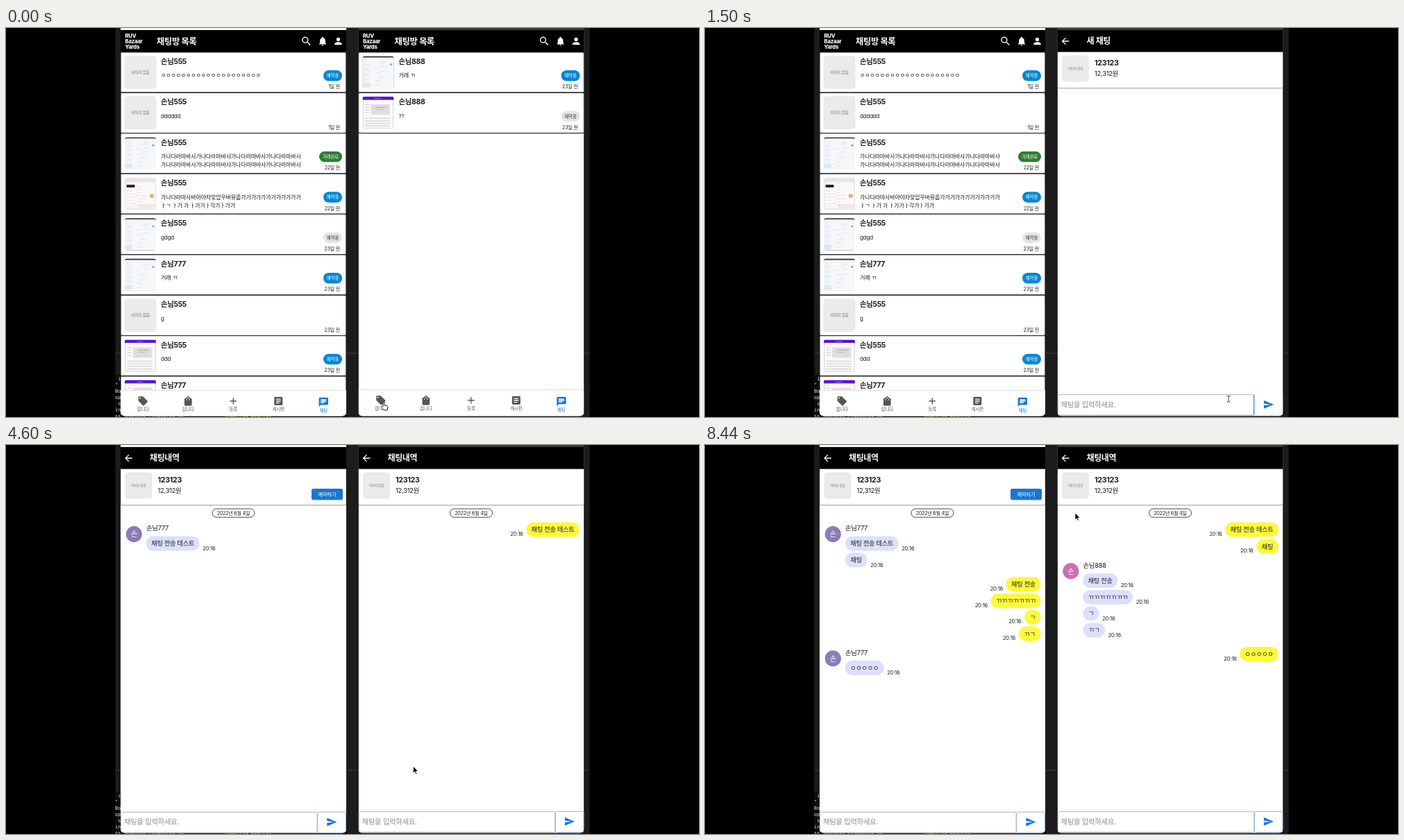
Recreate the animation shown at these times as an HTML page. Size 998x561 px, loop 8.58 s.

```html
<!DOCTYPE html>
<html lang="ko">
<head>
<meta charset="utf-8">
<title>채팅 데모</title>
<style>
html, body { margin: 0; width: 100%; height: 100%; overflow: hidden; background: #000; }
svg { display: block; }
#stage { width: 100vw; height: 100vh; }
text { font-family: Inter, "Noto Sans CJK KR", "Noto Sans CJK", sans-serif; letter-spacing: -.03em; white-space: pre; }
.mono { font-family: "DejaVu Sans Mono", monospace; letter-spacing: 0; }
</style>
</head>
<body>
<svg id="stage" viewBox="0 0 998 561"></svg>
<script>
const LOOP = 8580, W = 325, BLUE = '#1976d2', INK = '#1d1d1d';
const stage = document.getElementById('stage');

const ICON = {
  tag: 'M21.4 11.6l-9-9C12 2.2 11.5 2 11 2H4a2 2 0 0 0-2 2v7c0 .5.2 1 .6 1.4l9 9a2 2 0 0 0 2.8 0l7-7a2 2 0 0 0 0-2.8zM5.5 7a1.5 1.5 0 1 1 0-3 1.5 1.5 0 0 1 0 3z',
  bag: 'M18 6h-2a4 4 0 0 0-8 0H6a2 2 0 0 0-2 2v12a2 2 0 0 0 2 2h12a2 2 0 0 0 2-2V8a2 2 0 0 0-2-2zm-8 4H8V8h2zm2-6a2 2 0 0 1 2 2h-4a2 2 0 0 1 2-2zm4 6h-2V8h2z',
  plus: 'M19 13h-6v6h-2v-6H5v-2h6V5h2v6h6z',
  board: 'M5 3h14a2 2 0 0 1 2 2v14a2 2 0 0 1-2 2H5a2 2 0 0 1-2-2V5a2 2 0 0 1 2-2zm2 4v2h10V7zm0 4v2h10v-2zm0 4v2h7v-2z',
  chat: 'M20 2H4a2 2 0 0 0-2 2v18l4-4h14a2 2 0 0 0 2-2V4a2 2 0 0 0-2-2zM6 9h12v2H6zm8 5H6v-2h8zm4-6H6V6h12z',
  search: 'M15.5 14h-.8l-.3-.3A6.5 6.5 0 1 0 13.7 14.4l.3.3v.8l5 5 1.5-1.5zM9.5 14a4.5 4.5 0 1 1 0-9 4.5 4.5 0 0 1 0 9z',
  bell: 'M12 22a2 2 0 0 0 2-2h-4c0 1.1.9 2 2 2zm6-6v-5c0-3.1-1.6-5.6-4.5-6.3V4a1.5 1.5 0 0 0-3 0v.7C7.6 5.4 6 7.9 6 11v5l-2 2v1h16v-1z',
  person: 'M12 12a4 4 0 1 0 0-8 4 4 0 0 0 0 8zm0 2c-2.7 0-8 1.3-8 4v2h16v-2c0-2.7-5.3-4-8-4z',
  back: 'M20 11H7.8l5.6-5.6L12 4l-8 8 8 8 1.4-1.4L7.8 13H20z',
  send: 'M2 21l21-9L2 3v7l15 2-15 2z',
  heart: 'M12 20.5C5 14.3 2.8 12 2.8 8.6a4.8 4.8 0 0 1 4.7-4.8c1.7 0 3.4.9 4.5 2.4 1.1-1.5 2.8-2.4 4.5-2.4a4.8 4.8 0 0 1 4.7 4.8c0 3.4-2.2 5.7-9.2 11.9z'
};

// Text is placed by its vertical centre.
function text(x, cy, size, str, o = {}) {
  return `<text x="${x}" y="${cy + size * .37}" font-size="${size}" fill="${o.fill || INK}" font-weight="${o.bold || 400}" text-anchor="${o.at || 'start'}" ${o.attr || ''}>${str}</text>`;
}
function rect(x, y, w, h, fill, r = 0, extra = '') {
  return `<rect x="${x}" y="${y}" width="${w}" height="${h}" fill="${fill}" rx="${r}" ${extra}/>`;
}
function icon(name, cx, cy, size, fill, extra = '') {
  const k = size / 24;
  return `<path transform="translate(${cx - size / 2} ${cy - size / 2}) scale(${k})" d="${ICON[name]}" fill="${fill}" fill-rule="evenodd" ${extra}/>`;
}
const mid = (o = {}) => ({ at: 'middle', ...o });
const end = (o = {}) => ({ at: 'end', ...o });

function random(seed) {
  return () => (seed = (seed * 16807) % 2147483647) / 2147483647;
}

// Thumbnails, drawn on a 100 by 100 field.
const THUMB = {
  doc(rnd) {
    let s = rect(0, 0, 100, 100, '#3a2530', 8) + rect(0, 4, 100, 96, '#f6f7f9', 4) + rect(0, 8, 22, 84, '#f0f3f7') + rect(0, 84, 24, 12, '#d9e9f9');
    for (let i = 0; i < 17; i++) s += rect(i % 3 ? 32 + rnd() * 30 : 5, 12 + i * 4.8, 6 + rnd() * 16, 1.2, '#d3d7df');
    return s + rect(87, 23, 8, 5, '#6ba6f0', 2.5) + rect(62, 8, .8, 88, '#e6e8ec');
  },
  board(rnd) {
    let s = rect(0, 0, 100, 100, '#ece2ee', 8) + rect(3, 14, 94, 82, '#faf9fa') + rect(6, 22, 26, 8, '#181818') + rect(44, 82, 54, 12, '#f9e4e5');
    for (let i = 0; i < 16; i++) s += rect(i % 2 ? 6 : 42, 16 + i * 4.9, 10 + rnd() * 22, 1.3, '#d6d1d8');
    return s + rect(80, 51, 13, 11, '#dcb56b', 2) + rect(36, 14, 1, 82, '#e2d8e0');
  },
  form() {
    let s = rect(0, 0, 100, 100, '#d9d9df', 7) + rect(0, 0, 100, 12, '#5a12d8', 5) + rect(3, 10, 94, 87, '#fafafa') + rect(27, 24, 60, 32, '#e0dcdf') + rect(42, 32, 36, 1.5, '#999') + rect(42, 38, 24, 1.5, '#aaa');
    for (let i = 0; i < 4; i++) s += rect(8, 65 + i * 8, 80, 4, '#dedee2') + rect(8, 24 + i * 8, 14, 2, '#c8c8cd');
    return s + rect(38, 5, 20, 1.5, '#b99cf2');
  },
  dark(rnd) {
    let s = rect(0, 0, 100, 100, '#4d2179', 7) + rect(0, 4, 100, 96, '#1b2a31', 6) + rect(0, 8, 14, 88, '#1f3038');
    for (let i = 0; i < 26; i++) s += rect(18 + (i % 2) * 36 + rnd() * 10, 12 + i * 3.2, 4 + rnd() * 14, .9, i % 4 ? '#384b53' : '#55716f');
    return s + rect(58, 8, .8, 90, '#2f4049');
  },
  cal() {
    let s = rect(0, 0, 100, 100, '#fbf9f8', 7) + rect(4, 5, 12, 2.5, '#a05a62');
    for (let i = 0; i < 35; i++) s += rect(5 + i % 7 * 13.5, 18 + Math.floor(i / 7) * 16, 2.5, 1.6, '#c3bec0') + rect(3 + i % 7 * 13.5, 15 + Math.floor(i / 7) * 16, 12, .5, '#efe8e8');
    return s + rect(44, 38, 12, 2.5, '#f5cdc8') + rect(70, 70, 12, 2.5, '#f5cdc8');
  }
};
function thumb(kind, x, y, w, h, label) {
  if (kind === 'none')
    return rect(x, y, w, h, '#ebebeb', 4, 'stroke="#dedede" stroke-width=".6"') + text(x + w / 2, y + h / 2, label, '이미지 없음', mid({ fill: '#777' }));
  return `<svg x="${x}" y="${y}" width="${w}" height="${h}" viewBox="0 0 100 100" preserveAspectRatio="none">${THUMB[kind](random(kind.length * 97 + 5))}</svg>`;
}

const CHIP = { blue: ['예약중', '#0288d1', '#fff', 27], green: ['거래완료', '#2e7d32', '#fff', 33], gray: ['예약중', '#e4e4e4', '#333', 27] };
function chip(kind, right, cy) {
  const [label, bg, fg, w] = CHIP[kind];
  return rect(right - w, cy - 7.7, w, 15.4, bg, 7.7) + text(right - w / 2, cy, 6.5, label, mid({ fill: fg, bold: 500 }));
}

const ga = '가나다라마바사'.repeat(4);
const ROOMS = [
  ['손님555', ['ㅇ'.repeat(20)], 'blue', '1일 전', 'none'],
  ['손님555', ['dddddd'], '', '1일 전', 'none'],
  ['손님555', [ga, ga], 'green', '22일 전', 'doc'],
  ['손님555', ['가나다라마사바아아자앚압우버뮤웁' + '가'.repeat(12), 'ㅏㄱ ㅏ가 가 ㅏ가가ㅏ각가ㅏ가가'], 'blue', '22일 전', 'board'],
  ['손님555', ['gdgd'], 'gray', '23일 전', 'doc'],
  ['손님777', ['거래 ㄲ'], 'blue', '23일 전', 'doc'],
  ['손님555', ['g'], '', '23일 전', 'none'],
  ['손님555', ['ddd'], 'blue', '23일 전', 'form'],
  ['손님777', [''], '', '', 'form']
];
const NEW_ROOM = ['손님777', ['채팅 전송 테스트'], '', '', 'none'];
const MY_ROOMS = [
  ['손님888', ['거래 ㄲ'], 'blue', '23일 전', 'doc'],
  ['손님888', ['??'], 'gray', '23일 전', 'form']
];
const ITEMS = [
  ['123123', '', '12,312원', '1시간 전', 'none'],
  ['등록 글 수정 테스트', '', '10,000원', '2시간 전', 'none'],
  ['asdasd', '기초도면실습II / 문가람', '20,000원', '2시간 전', 'dark'],
  ['123123', '생활작문 / 토바린메즈', '123,123원', '3시간 전', 'cal'],
  ['팝니다 등록 테스트', '기초도면실습II / 문가람', '20,000원', '3시간 전', 'dark'],
  ['ㅇ'.repeat(25), '실용의사소통연습 / 표나율', '21,212원', '22일 전', 'none'],
  ['이미지도 올리고 수정', '전공탐색과생애설... / 하루미세나', '2,222원', '22일 전', 'board']
];

const frameRow = (y, h) => rect(0, y, W, h, '#fff', 2, 'stroke="#333" stroke-width="1.4"');

function roomRow([name, lines, mark, ago, pic], i) {
  const y = 34.8 + i * 58.4;
  return frameRow(y, 58.4) + thumb(pic, 6, y + 5.8, 45, 46.6, 5.7) +
    text(58, y + 13.2, 10.4, name, { bold: 700 }) +
    lines.map((s, n) => text(58, y + 33.6 + n * 12.3, 8.1, s)).join('') +
    (mark ? chip(mark, 319, y + 34) : '') + text(316, y + 50, 7, ago, end());
}

function itemRow([title, course, price, ago, pic], i) {
  const y = 34.6 + i * 70.4, x = 76.5;
  let s = frameRow(y, 70.4) + thumb(pic, 4, y + 3.6, 65.5, 62.5, 8.1) + text(x, y + 12.2, 9.15, title);
  if (i === 5) s += text(x, y + 25.5, 9.15, 'ㅇ'.repeat(20));
  if (course) s += rect(74, y + 38.2, 34.5, 13.2, '#e4e4e4', 6.6) + text(91.2, y + 44.8, 6.3, '대학', mid({ bold: 500 })) + text(112, y + 44.8, 7.1, course);
  if (i === 6) s += chip('gray', 318.5, y + 44.8);
  return s + text(x, y + 58.6, 11.8, price, { bold: 700 }) + text(317.5, y + 60.6, 7, ago, end({ fill: '#555' })) +
    icon('heart', 310.5, y + 13.4, 16, 'none', 'stroke="#555" stroke-width="2"');
}

function header(title) {
  const brand = ['RUV', 'Bazaar', 'Yards'].map((s, i) => text(6.5, 11.6 + i * 7.8, 7.7, s, { fill: '#fff', bold: 800 })).join('');
  return rect(0, 3, W, 31.6, '#000') + brand + text(52, 19, 12.3, title, { fill: '#fff', bold: 700 }) +
    icon('search', 267.7, 19, 17, '#fff') + icon('bell', 291, 19, 15.5, '#fff') + icon('person', 313.5, 19, 15.5, '#fff');
}

function nav(active, top) {
  const tabs = [['tag', '팝니다'], ['bag', '삽니다'], ['plus', '등록'], ['board', '게시판'], ['chat', '채팅']];
  return rect(0, top, W, 40, '#fff') + rect(0, top - 1, W, 1.4, '#e6e6e6') + tabs.map(([name, label], i) => {
    const on = i === active, fill = on ? BLUE : '#555', x = 32.3 + i * 65, y = top + (on ? 1.6 : 0);
    return icon(name, x, y + 15, 16, fill) + text(x, y + 26.7, 6.4, label, mid({ fill }));
  }).join('');
}

// [time, own message, text, bubble width, centre y]
const LEFT_CHAT = [
  [0, 0, '채팅 전송 테스트', 77, 142], [5100, 0, '채팅', 32, 166], [6300, 1, '채팅 전송', 50, 200.7],
  [6700, 1, 'ㄲ'.repeat(7), 72, 224.7], [7000, 1, 'ㄱ', 23.5, 248.2], [7300, 1, 'ㄲㄱ', 32, 272.2], [8100, 0, 'ㅇ'.repeat(5), 56, 321.5]
];
const RIGHT_Y = [122, 146.3, 195.5, 219.4, 243, 267, 301.5];
const RIGHT_CHAT = LEFT_CHAT.map(([t, own, s, w], i) => [t || 3100, 1 - own, s, w, RIGHT_Y[i]]);
const LEFT_HEADS = [[0, '손님777', 120], [8100, '손님777', 299.3]];
const RIGHT_HEADS = [[6300, '손님888', 173.3]];

function bubble([, own, str, w, cy]) {
  const x = own ? 318.5 - w : 36.7;
  return rect(x, cy - 10.5, w, 21, own ? '#fbf93c' : '#dcdffd', 10.5) + text(x + w / 2, cy, 9.2, str, mid()) +
    (own ? text(x - 4.5, cy + 6.3, 7.6, '20:16', end()) : text(x + w + 4.5, cy + 6.8, 7.6, '20:16'));
}
function head([, name, cy], color) {
  return `<circle cx="19.3" cy="${cy + 8.6}" r="11.6" fill="${color}"/>` + text(19.3, cy + 8.6, 10.4, name[0], mid({ fill: '#fff' })) + text(37, cy, 9.4, name);
}

// What each input holds from a given time on; an empty string means sent.
const LEFT_TYPING = [[0, ''], [5600, 'ㅊ'], [5700, '채'], [5800, '채티'], [5900, '채팅'], [6000, '채팅 저'], [6100, '채팅 전ㅅ'], [6200, '채팅 전송'], [6300, ''],
  [6400, 'ㄲㄲ'], [6500, 'ㄲㄲㄲㄲ'], [6600, 'ㄲ'.repeat(7)], [6700, ''], [6900, 'ㄱ'], [7000, ''], [7100, 'ㄲ'], [7200, 'ㄲㄱ'], [7300, '']];
const RIGHT_TYPING = [[0, ''], [1900, 'ㅊ'], [2000, '채'], [2100, '채티'], [2200, '채팅'], [2300, '채팅 저'], [2400, '채팅 전'], [2500, '채팅 전소'], [2600, '채팅 전송'],
  [2800, '채팅 전송 테'], [2900, '채팅 전송 테스트'], [3100, ''], [4800, '채'], [4900, '채팅'], [5100, ''], [7800, 'ㅇ'], [7900, 'ㅇㅇㅇ'], [8000, 'ㅇ'.repeat(5)], [8100, '']];
const LEFT_FOCUS = [[5500, 7600]], RIGHT_FOCUS = [[1800, 3200], [4700, 5300], [7700, 8200]];
const latest = (list, t) => list.filter(e => e[0] <= t).pop();
const within = (spans, t) => spans.some(([a, b]) => t >= a && t < b);

function inputBar(str, focused, hover, y, sendBorder) {
  const edge = focused ? 'stroke="#1565c0" stroke-width="1.6"' : 'stroke="#aaa" stroke-width=".9"';
  let s = rect(0, y, W, 31, '#fff') + rect(283.8, y + .5, 40.7, 30, hover ? '#f1f7fd' : '#fff', 2, sendBorder ? 'stroke="#8fbce9" stroke-width="1"' : '') +
    rect(.7, y + .7, 282.4, 29.6, '#fff', 2, edge) + icon('send', 304, y + 15, 16, BLUE);
  if (!sendBorder) s += rect(282.6, y + 1, 1, 29, BLUE);
  if (!str) return s + text(5, y + 14.7, 10.4, '채팅을 입력하세요.', { fill: '#8c8c8c' });
  const last = str.length - 1;
  return s + text(5, y + 14.7, 10.4, str.slice(0, last) + `<tspan text-decoration="underline">${str[last]}</tspan>`, { attr: 'class="typed"' }) +
    `<rect class="caret" x="5" y="${y + 9}" width=".8" height="12" fill="#111"/>`;
}

function chatPage(title, body, bar, button) {
  let s = rect(0, 3, W, 31.6, '#000') + icon('back', 11.5, 19, 16, '#fff') + text(42, 19, 12, title, { fill: '#fff', bold: 700 }) +
    `<path d="M0 35V85q0 1.8 2 1.8H${W - 2}q2 0 2-1.8V35" fill="none" stroke="#999" stroke-width="1"/>` +
    thumb('none', 7.2, 40, 37.6, 37, 4.6) + text(53.5, 50, 10.7, '123123', { bold: 700 }) + text(53.5, 66, 9.4, '12,312원');
  if (button) s += rect(275, 63.8, 45, 16, '#9fb4c9', 2.5) + rect(275, 63, 45, 15.8, BLUE, 2.5) + text(297.5, 70.8, 7.3, '예약하기', mid({ fill: '#fff', bold: 500 }));
  return s + body + bar;
}
const datePill = rect(132, 92, 61, 12.2, '#fff', 6.1, 'stroke="#333" stroke-width=".9"') + text(162.5, 98.1, 7.1, '2022년 6월 4일', mid());

function chatBody(chat, heads, color, t) {
  const past = e => e[0] <= t;
  return datePill + heads.filter(past).map(h => head(h, color)).join('') + chat.filter(past).map(bubble).join('');
}

function leftPanel(t) {
  if (t >= 4300)
    return chatPage('채팅내역', chatBody(LEFT_CHAT, LEFT_HEADS, '#8c7bb9', t),
      inputBar(latest(LEFT_TYPING, t)[1], within(LEFT_FOCUS, t), t >= 7000 && t < 7400, 528.7, true), true);
  let body = ROOMS.map(roomRow).join('');
  if (t >= 3500) body = text(162.5, 46, 9.3, '채팅방 목록 더보기', mid({ fill: BLUE }));
  if (t >= 4000) body = [NEW_ROOM, ...ROOMS].map(roomRow).join('');
  return body + header('채팅방 목록') + nav(4, 523);
}

function rightPanel(t) {
  if (t < 200) return MY_ROOMS.map(roomRow).join('') + header('채팅방 목록') + nav(4, 522);
  if (t < 1400) {
    const tip = t >= 500 ? rect(0, 546, 93.5, 14, '#2c2c2e', 2) + text(3.5, 552.5, 8, 'localhost:3000/item/66', { fill: '#fff', bold: 500 }) : '';
    return ITEMS.map(itemRow).join('') + header('팝니다') + nav(0, 522) + tip;
  }
  const bar = inputBar(latest(RIGHT_TYPING, t)[1], within(RIGHT_FOCUS, t), false, 528, t >= 3100);
  return t < 3100 ? chatPage('새 채팅', '', bar) : chatPage('채팅내역', chatBody(RIGHT_CHAT, RIGHT_HEADS, '#c86fb6', t), bar);
}

// [time, x, y, shape]
const POINTER = [
  [0, 545, 545, 'hand'], [300, 545, 545, 'hand'], [800, 639, 67, 'hand'], [1100, 639, 67, 'hand'], [1400, 754, 535, 'beam'], [1900, 754, 535, ''],
  [3100, 754, 535, 'arrow'], [3400, 457, 543, 'hand'], [3500, 457, 543, 'arrow'], [3800, 377, 370, 'arrow'], [4000, 377, 370, 'arrow'],
  [4200, 310, 65, 'hand'], [4300, 310, 65, 'arrow'], [4700, 640, 543, 'beam'], [4800, 640, 543, ''], [5100, 640, 543, 'arrow'],
  [5500, 310, 543, 'beam'], [5600, 400, 545, ''], [6800, 400, 545, 'beam'], [7000, 460, 550, 'hand'], [7300, 460, 550, 'arrow'],
  [7700, 640, 543, 'beam'], [7800, 640, 543, ''], [8100, 640, 543, 'arrow'], [8300, 578, 135, 'arrow'], [8440, 535, 103, 'arrow']
];
const SHAPE = {
  hand: '<path d="M-2 1V-5a1 1 0 0 1 2 0V-1l3.6.8q1.5.4 1.3 2L4.2 6H-1L-4.5 2.2q-.6-1.3.8-1.2z" fill="#fff" stroke="#222" stroke-width="1"/>',
  arrow: '<path d="M-2-5V5L.3 2.9 1.8 6.3 3.4 5.6 1.9 2.3H5z" fill="#000" stroke="#fff" stroke-width=".7"/>',
  beam: '<path d="M-2.5-4.5Q0-4.5 0-3V3Q0 4.5-2.5 4.5M2.5-4.5Q0-4.5 0-3M0 3Q0 4.5 2.5 4.5" fill="none" stroke="#444" stroke-width="1"/>'
};
function pointer(t) {
  const a = latest(POINTER, t), b = POINTER[POINTER.indexOf(a) + 1] || a;
  if (!a[3]) return '';
  const u = b === a ? 0 : (t - a[0]) / (b[0] - a[0]), k = u * u * (3 - 2 * u);
  return `<g transform="translate(${a[1] + (b[1] - a[1]) * k} ${a[2] + (b[2] - a[2]) * k})">${SHAPE[a[3]]}</g>`;
}

function backdrop() {
  const bits = [' i', '"', 'Bo', 'op', ' s', 'in', 'ss'];
  return rect(0, 0, 998, 561, '#000') + rect(157.5, 0, 683, 561, '#1c1c1c') + rect(157.5, 468.6, 683, .9, '#424242') +
    rect(157.5, 500, 8, 61, '#0c0c0c') + rect(157.5, 558, 333, 3, '#0c0c0c') +
    bits.map((s, i) => text(157, 505.5 + i * 9, 7, s, { fill: '#ddd', attr: 'class="mono"' })).join('') +
    text(172, 561, 7, 'process listening on', { fill: '#bbb', attr: 'class="mono"' }) +
    text(315, 561, 7, 'compiled modules', { fill: '#c9c43a', attr: 'class="mono"' }) +
    rect(165, 0, W, 3, '#f3f8f5') + rect(507.5, 0, W, 3, '#3b3b3b');
}
const panel = (x, body) => `<g transform="translate(${x} 0)"><g clip-path="url(#card)">${rect(0, 3, W, 557, '#fff')}${body}</g></g>`;
const clip = `<clipPath id="card"><path d="M0 3H${W}V553q0 6.4-6 6.4H6Q0 559.4 0 553z"/></clipPath>`;

function draw(t) {
  stage.innerHTML = clip + backdrop() + panel(165, leftPanel(t)) + panel(507.5, rightPanel(t)) + pointer(t);
  const typed = stage.querySelector('.typed');
  if (typed) stage.querySelector('.caret').setAttribute('x', 5 + typed.getComputedTextLength());
}

let shown = -1;
function tick(now) {
  const t = now % LOOP;
  const step = t >= 8440 ? 8440 : Math.min(8300, Math.floor(t / 100) * 100);
  if (step !== shown) draw(shown = step);
  requestAnimationFrame(tick);
}
draw(0);
requestAnimationFrame(tick);
</script>
</body>
</html>
```
